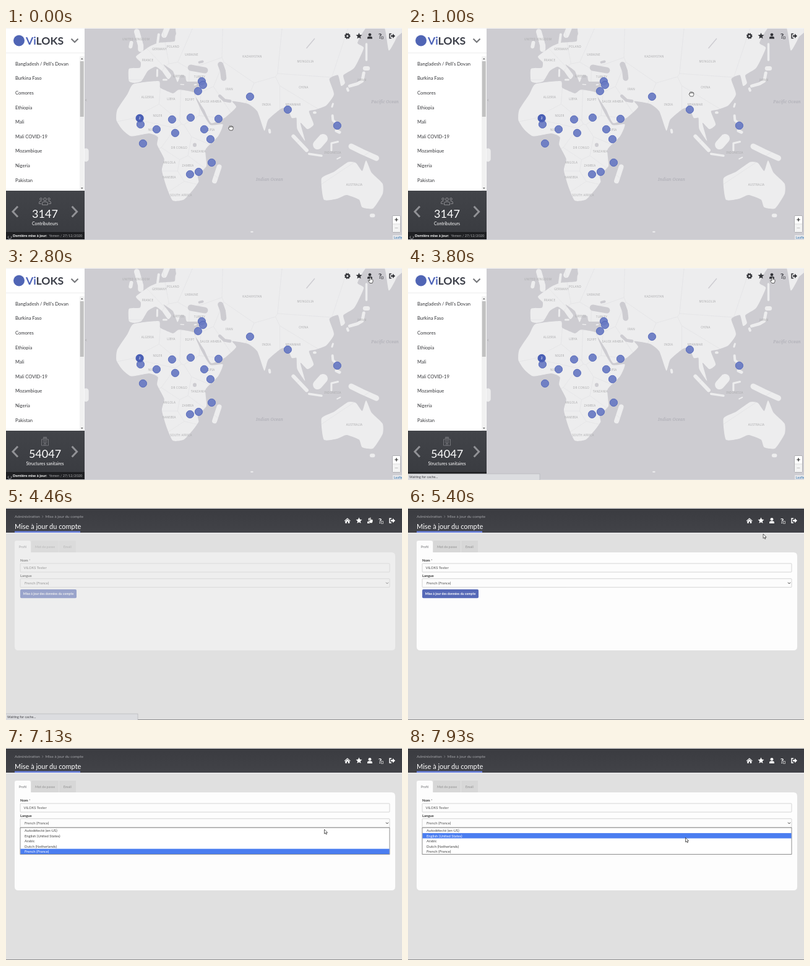
Recreate the animation shown at these times as an HTML page. Size 640 by 344 pixels, loop 8 s.

```html
<!DOCTYPE html>
<html lang="fr">
<head>
<meta charset="utf-8">
<style>
html, body { margin: 0; width: 100%; height: 100%; overflow: hidden; background: #e0e0e0; }
svg { display: block; width: 100vw; height: 100vh; font-family: Lato, "Open Sans", sans-serif; }
.map text { font: 4.5px "Noto Sans", "Open Sans", sans-serif; letter-spacing: .32px; fill: #aaaaac; text-anchor: middle; }
.map .sea { font: italic 6.8px "Noto Serif", serif; letter-spacing: .15px; fill: #aaaab2; }
.mid { text-anchor: middle; }
.b { font-weight: bold; }
</style>
</head>
<body>
<svg id="stage" viewBox="0 0 640 344"></svg>
<script>
const LOOP = 8000;
const stage = document.getElementById('stage');

const text = (x, y, size, fill, str, cls = '') =>
  `<text x="${x}" y="${y}" font-size="${size}" fill="${fill}" class="${cls}">${str}</text>`;
const rect = (x, y, w, h, fill, more = '') =>
  `<rect x="${x}" y="${y}" width="${w}" height="${h}" fill="${fill}" ${more}/>`;
const line = (d, color, w) => `<path d="${d}" fill="none" stroke="${color}" stroke-width="${w}"/>`;
const words = s => s.trim().split(/\s+/).map(w => w.split(','));

// Mercator: longitude/latitude to stage pixels
const project = ([lon, lat]) => [
  221.5 + lon * 2.53,
  187 - 145 * Math.log(Math.tan(Math.PI / 4 + lat * Math.PI / 360))
];
const points = s => words(s).map(p => project(p.map(Number)));
const pair = p => p.map(v => v.toFixed(1)).join(' ');

// Smooth closed coast through a few key points
function coast(s) {
  const pts = points(s), n = pts.length, at = i => pts[(i + n) % n];
  const lean = (i, k) => pair(at(i).map((v, c) => v + k * (at(i + 1)[c] - at(i - 1)[c]) / 11));
  return 'M' + pair(pts[0]) + pts.map((_, i) => `C${lean(i, 1)} ${lean(i + 1, -1)} ${pair(at(i + 1))}`).join('') + 'Z';
}
const mainland = [
  // Africa
  `-6,35.5 10,37 11,33.5 19,30.5 23,32.5 32.5,31 34,27 37.5,20 43,11.7 51,12 48,4.5 40,-4 40.5,-14.5 35,-20
   35.5,-24 32,-28.5 26,-34 19,-34.5 15,-27 12,-17 13.5,-10 9,-1 9.5,4 4,6.3 -7.5,4.5 -13,8.5 -17,14.5 -16.5,21 -10,30`,
  // Eurasia
  `-9,43 -9,37 -5.5,36 -1,37 3,42 8,44 12,42 16,38 18,40 13,45 19,42 22,36.5 24,40 27,39.5 28,36.8 36,36.5 34.5,31
   32.5,31 34,28 39,21 43.5,12.8 52,16 59.5,22.5 57,26 67,24.5 73,20 77.5,8 80,15 88,21.5 92,22 95,16 98,16 98.5,9
   103.5,1.5 100.5,13 105,9 109,12 106,20 110,21 117,23.5 122,30 119,38 124.5,40 126.5,34.5 129,36 128,40 135,43.5
   141,52 137,54 143,59.5 154,59.5 157,51 162,56 166,62 30,62 21,57 20,54.5 10,54 4,52.5 -4.5,48.5 -1.5,46 -2,43.5`,
  // Australia
  `114,-22 115.5,-34 124,-33.5 130,-31.5 138,-34 140,-38 147,-38.5 153,-31 153,-25 146,-18.5 142.5,-11 140,-17.5
   136,-12.5 131,-12 122,-18`
];
// Islands and inner seas are round strokes: width, then the spine
const islands = `9:-1.5,51.5 -1.5,53 -4,58|6:-8,52.5 -7.5,54|10:7,60 8,60|9:13.5,56.8 16,60|4:9.3,54 10,57
  |8:45.7,-23.5 48.6,-15|4:80.7,8.5 81,7|6:96,4.5 104.5,-4.5|3.5:106,-6.8 114,-8|15:111.5,-1 115,3|3:120.3,-4.5 120.3,0 124.5,1
  |9:133,-2 140,-5.5 149,-9.5|4:121,17.5 121.3,14.5 124,12.5|5:123.5,8 125.5,7|2:124,-10 126,-9|3:121.3,24.5 120.7,22.8
  |4:109.3,19.3 110,19.3|4:130.5,33 131,32|5:132,34.4 137,35.6 140,37 141,41|7:141.8,43.2 143.5,43.2|3.5:142.7,47 142.7,53.5
  |3:13,37.7 15,37.7|3:9,39.5 9.1,42.5|1.5:24,35.3 26,35.2|2:32.8,35 34,35.2|6:146,-42 147,-42|9:-36.5,-5 -36.5,-10|2:69,-49.3 70,-49.3`;
const seas = `10:30.5,43.5 34,43 39.5,42.3|4:36,46 38,46.3|9:49.5,45 51,42 51.5,38.5|5:49,29 52,26.5 55.5,26|6:33,-1 33,-1.2|1.5:104.5,52 109.5,55.5`;
const strokes = (s, color) => s.split('|').map(item => {
  const [w, spine] = item.trim().split(':');
  return line('M' + points(spine).map(pair).join('L'), color, w);
}).join('');

const labels = words(`UNITED_KINGDOM,210,20 GERMANY,248,36 FRANCE,229,54 POLAND,270,32 UKRAINE,300,45 GREECE,279,80
  TURKEY,313,81 KAZAKHSTAN,398,47.5 MONGOLIA,484,56 CHINA,481,98 JAPAN,575,86 ALGERIA,229,114 LIBYA,267,117 EGYPT,297,118
  SAUDI_ARABIA,331,121 IRAN,361,101 INDIA,421,126 MYANMAR,464,126 NIGER,245,144 NIGERIA,240,167 ETHIOPIA,326,167
  DR_CONGO,280,196 TANZANIA,311,202 ANGOLA,264,220 ZAMBIA,294,225 NAMIBIA,264,244 SOUTH_AFRICA,283,273
  AUSTRALIA,563,255.5 INDONESIA,528,203.5`).map(([s, x, y]) => ({ s: s.replace('_', ' '), p: [+x, +y] }));

// Borders: each label owns the land nearest to it
function cell(p) {
  let poly = [[0, 0], [640, 0], [640, 344], [0, 344]];
  for (const { p: q } of labels) {
    if (q === p) continue;
    const side = v => Math.hypot(v[0] - q[0], v[1] - q[1]) ** 2 - Math.hypot(v[0] - p[0], v[1] - p[1]) ** 2;
    poly = poly.flatMap((a, i) => {
      const b = poly[(i + 1) % poly.length], sa = side(a), sb = side(b), k = sa / (sa - sb);
      const cut = sa * sb < 0 ? [a.map((v, c) => v + k * (b[c] - v))] : [];
      return sa >= 0 ? [a, ...cut] : cut;
    });
  }
  return 'M' + poly.map(pair).join('L') + 'Z';
}

const sites = words(`316,86 318,92 310,102 394,111 455,132 535,158 298,145 268,148 343,147 217,156 243,164
  273,170 320,164 330,180 221,187 332,218 311,233 297,237`);

const star = 'M' + Array.from({ length: 10 }, (_, i) => {
  const r = i % 2 ? 2.4 : 5.2, a = i * Math.PI / 5;
  return `${(r * Math.sin(a)).toFixed(2)} ${(-r * Math.cos(a)).toFixed(2)}`;
}).join('L') + 'Z';
const gear = c => `<circle r="2.7" fill="none" stroke="${c}" stroke-width="2.2"/>
  <circle r="4" fill="none" stroke="${c}" stroke-width="1.5" stroke-dasharray="1.8 1.34"/>`;
const home = c => `<path d="M-5 .3L0-4.2 5 .3 4.3 1 0-2.8-4.3 1ZM-3.5 1L0-2 3.5 1V4.3H1V1.6H-1V4.3H-3.5Z" fill="${c}"/>`;
const toolbar = (y, first, c) => {
  const at = (x, s) => `<g transform="translate(${x} ${y})">${s}</g>`;
  return at(551.8, first(c)) + at(570.5, `<path d="${star}" fill="${c}"/>`) +
    at(588, `<circle cy="-2.2" r="2.4" fill="${c}"/><path d="M-4 4.5V3Q-4 .7-1.6 .7H1.6Q4 .7 4 3V4.5Z" fill="${c}"/>`) +
    at(604.5, text(0, 4.3, 12, c, '?', 'mid b') + `<rect x="2" y="1.2" width="3.2" height="3.4" fill="none" stroke="${c}" stroke-width=".6"/>`) +
    at(624, line('M-1-3.6H-4V3.6H-1', c, 1.5) + `<path d="M-2-1.2H1V-3.8L5 0 1 3.8V1.2H-2Z" fill="${c}"/>`);
};

const countries = ["Bangladesh / Pell's Dovan", 'Burkina Faso', 'Comores', 'Ethiopia', 'Mali',
  'Mali COVID-19', 'Mozambique', 'Nigeria', 'Pakistan'];
const people = `<circle cx="63" cy="278" r="2.3" fill="none" stroke="#a2a3a6" stroke-width=".8"/>` +
  [56.5, 69.5].map(x => `<circle cx="${x}" cy="277.5" r="1.7" fill="none" stroke="#a2a3a6" stroke-width=".8"/>`).join('') +
  line('M58.5 287V285Q58.5 282 61 282H65Q67.5 282 67.5 285V287ZM57.5 281H56Q53.5 281 53.5 283.5V285H57M68.5 281H70Q72.5 281 72.5 283.5V285H69', '#a2a3a6', .8);
const clinic = line('M57.5 288V278H68.5V288ZM60.5 278V274.5H65.5V278M63 275V277.5M61.8 276.2H64.2M61.8 288V284.5H64.2V288M59.5 280.5H66.5M59.5 283H66.5', '#8b8c90', .7);
const slide = (id, icon, n, label) =>
  `<g id="${id}">${icon}${text(63, 308, 18, '#fff', n, 'mid')}${text(63, 319.5, 6.9, '#fff', label, 'mid')}</g>`;

const mapPage = `<g id="mapPage">
  ${rect(0, 0, 640, 344, '#cdccd1')}
  <mask id="soil" maskUnits="userSpaceOnUse" x="0" y="0" width="640" height="344">
    <path d="${mainland.map(coast).join('')}" fill="#fff"/>
    <g stroke-linecap="round" stroke-linejoin="round">${strokes(islands, '#fff')}${strokes(seas, '#000')}</g>
  </mask>
  <g mask="url(#soil)">${rect(0, 0, 640, 344, '#ededee')}${line(labels.map(l => cell(l.p)).join(''), '#e3e3e5', .5)}</g>
  <g class="map">
    ${labels.map(({ s, p }) => `<text x="${p[0]}" y="${p[1]}">${s}</text>`).join('')}
    <text class="sea" x="426" y="248">Indian Ocean</text><text class="sea" x="612.5" y="122">Pacific Ocean</text>
  </g>
  <g transform="translate(.4 .4)">
    ${sites.map(([x, y]) => `<circle cx="${x}" cy="${y}" r="6.1" fill="#687ac3" fill-opacity=".93" stroke="#5165b9" stroke-width=".9"/>`).join('')}
    <circle cx="215.7" cy="146" r="6.6" fill="#4a5fb5"/>${text(215.7, 148.1, 5.5, '#fff', '2', 'mid')}
  </g>
  ${toolbar(13, gear, '#34353a')}
  ${rect(624.5, 304.5, 13, 27, '#fff', 'rx="1.5" stroke="#b0b0b4"')}
  ${rect(625, 318, 12, 13, '#f4f4f4')}${line('M625 318H637', '#ccc', .6)}
  ${line('M628.3 311H633.7M631 308.3V313.7', '#222', 1.2)}${line('M628.5 324.5H633.5', '#bbb', .9)}
  ${rect(625, 336, 15, 7, '#e4e4e7')}${text(627, 341.6, 5.2, '#3178b4', 'Leaflet')}
  ${line('M130 115.5L128.5 117 130 118.5', '#999', .7)}
  ${rect(0, 0, 127, 264, '#fff')}
  <circle cx="21" cy="20.5" r="9" fill="#5065b5"/>
  <text x="32" y="26.5" font-size="17.6" class="b" fill="#3b3e48"><tspan fill="#4c62b8">Vi</tspan>LOKS</text>
  ${line('M105.5 17.5L111 23 116.5 17.5', '#77787c', 2.2)}
  ${rect(0, 40, 127, 1, '#ececec')}
  ${countries.map((s, i) => text(15, 60.8 + i * 23.6, 7.6, '#36373b', s)).join('')}
  ${rect(119, 46, 7.5, 218, '#f1f1f1')}${rect(119.7, 54, 6, 90, '#c1c1c1')}
  <path d="M121 51L122.8 48.8 124.6 51ZM121 259L122.8 261.2 124.6 259Z" fill="#666"/>
  ${rect(0, 264, 127, 67, 'url(#panel)')}
  ${line('M19 289.5L11 298 19 306.5M106.6 289.5L114.6 298 106.6 306.5', '#919296', 3)}
  ${slide('people', people, '3147', 'Contributeurs')}
  ${slide('clinics', clinic, '54047', 'Structures sanitaires')}
  ${rect(0, 331, 127, 12, '#1f2023')}
  ${line('M4.3 337.5A2.7 2.7 0 1 0 8.2 337.8', '#b8b8bb', .8)}
  ${text(11, 339.3, 6, '#fff', 'Dernière mise à jour:', 'b')}${text(69.5, 339.3, 5.7, '#a9aaad', 'Yemen / 27/12/2020')}
  ${rect(0, 343, 640, 1, '#d9d9dc')}
</g>`;

const options = ['Autodétecté (en-US)', 'English (United States)', 'Arabic', 'Dutch (Netherlands)', 'French (France)'];
const title = 'Mise à jour du compte';
const field = y => rect(23, y, 597, 14, '#fcfcfc', 'rx="1" stroke="#c9c9c9" stroke-width=".8"');
const formPage = `<g id="formPage">
  ${rect(0, 0, 640, 344, '#e0e0e0')}
  ${rect(0, 0, 640, 40, 'url(#head)')}${rect(0, 40, 640, 1.5, '#ebebed')}
  ${text(14, 16.2, 6.3, '#a3a4a8', 'Administration')}${line('M58.2 12.3L60 14 58.2 15.7', '#85868a', .7)}${text(63.5, 16.2, 6.3, '#a3a4a8', title)}
  ${text(14, 33.7, 11, '#fff', title)}${rect(14, 37.5, 106, 2.5, '#6b82e0')}
  ${toolbar(20.5, home, '#fff')}
  <g id="form">
    ${rect(41, 53, 44, 19, '#d7d7d7')}${rect(86, 53, 27, 19, '#d7d7d7')}
    <path d="M14 78V56Q14 53 17 53H37Q40 53 40 56V72H623Q629 72 629 78V225Q629 231 623 231H20Q14 231 14 225Z" fill="#fdfdfd"/>
    ${text(27, 64.8, 5.5, '#77787b', 'Profil', 'mid')}${text(63, 64.8, 5.4, '#a2a2a2', 'Mot de passe', 'mid b')}${text(99.3, 64.8, 5.4, '#a2a2a2', 'Email', 'mid b')}
    ${text(23, 87.3, 5.8, '#333', 'Nom <tspan fill="#888">*</tspan>', 'b')}
    ${field(90)}${text(28.5, 99.2, 5.9, '#555', 'ViLOKS Tester')}
    ${text(23, 112.3, 5.8, '#333', 'Langue', 'b')}
    ${field(114.7)}${text(30, 123.9, 5.9, '#555', 'French (France)')}
    ${line('M614 120.8L616 122.8 618 120.8', '#333', 1)}
    ${rect(23, 132, 91, 14.3, '#5669b7', 'rx="2"')}${text(68.5, 141, 5.2, '#fff', 'Mise à jour des données du compte', 'mid b')}
  </g>
  <g id="menu">
    ${rect(23, 129.2, 597, 43.3, '#fff', 'stroke="#707070" stroke-width=".8"')}
    <rect id="pick" x="23.4" width="596.2" height="8.5" fill="#4a7df0"/>
    ${options.map((s, i) => text(30, 136 + i * 8.5, 5.9, '#444', s, 'opt')).join('')}
  </g>
  ${rect(0, 343, 640, 1, '#8c8c8e')}
</g>`;

const ink = 'fill="#fff" stroke="#222" stroke-width=".7" stroke-linejoin="round"';
stage.innerHTML = `<defs>
  <linearGradient id="panel" x2="0" y2="1"><stop stop-color="#424449"/><stop offset="1" stop-color="#3a3c41"/></linearGradient>
  <linearGradient id="head" x2="0" y2="1"><stop stop-color="#3a3b40"/><stop offset="1" stop-color="#424348"/></linearGradient>
  </defs>${mapPage}${formPage}
  <g id="status">${rect(-1, 334, 214, 11, '#dcdde0', 'stroke="#b4b5b9" stroke-width=".7"')}${text(2, 341.2, 5.5, '#44454a', 'Waiting for cache...')}</g>
  ${rect(0, 0, 640, 1, '#f4f4f4')}
  <path id="grab" d="M-2 4L-4 .6Q-4-.8-2.6 0V-2.4Q-1.8-3.5-1.1-2.5-.3-3.8 .6-2.7 1.6-3.5 2.2-2.1 3.4-2.5 3.6-1.1V1.6L2.5 4ZM-1.1-2.5V-.6M.6-2.7V-.6M2.2-2.1V-.6" ${ink}/>
  <path id="point" d="M-1 0Q0-1.3 1 0V3Q2 2.3 2.6 3.2 3.6 2.8 4 4V6.3L3 9H-1L-3.6 5.2Q-3.4 3.8-2 4.7L-1 5.4Z" ${ink}/>
  <path id="arrow" d="M0 0V7.2L1.7 5.7 2.8 8.2 4 7.7 2.9 5.3H5.1Z" ${ink}/>`;

const $ = id => document.getElementById(id);
const show = (id, on) => $(id).setAttribute('display', on ? 'inline' : 'none');
const ramp = (t, a, b) => Math.min(1, Math.max(0, (t - a) / (b - a)));
const ease = p => p * p * (3 - 2 * p);

// Pointer moves: start time, end time, target
const moves = [[200, 1800, 552.5, 52], [1800, 2500, 589, 15.5], [5000, 6250, 527.5, 125],
  [6650, 7130, 514.5, 132], [7200, 7900, 448.5, 145.5]];
const pointer = t => moves.reduce(([x, y], [a, b, tx, ty]) => {
  const p = ease(ramp(t, a, b));
  return [x + (tx - x) * p, y + (ty - y) * p];
}, [363.5, 162]);

function draw(t) {
  const onForm = t >= 3860, [x, y] = pointer(t);
  show('mapPage', !onForm);
  show('formPage', onForm);
  show('status', t >= 3000 && t < 4700);
  $('people').setAttribute('opacity', 1 - ramp(t, 1300, 1600));
  $('clinics').setAttribute('opacity', ramp(t, 1600, 1910));
  $('form').setAttribute('opacity', ramp(t, 3860, 5060));

  show('menu', t >= 6560);
  const picked = t < 7200 ? 4 : y < 138 ? 0 : 1;
  $('pick').setAttribute('y', 129.6 + picked * 8.5);
  document.querySelectorAll('.opt').forEach((o, i) => o.setAttribute('fill', i === picked ? '#fff' : '#444'));

  const kind = y < 24 ? 'point' : onForm ? 'arrow' : 'grab';
  for (const id of ['grab', 'point', 'arrow']) show(id, id === kind);
  $(kind).setAttribute('transform', `translate(${x.toFixed(2)} ${y.toFixed(2)})`);
}

const start = performance.now();
function tick(now) {
  draw(Math.max(0, now - start) % LOOP);
  requestAnimationFrame(tick);
}
draw(0);
requestAnimationFrame(tick);
</script>
</body>
</html>
```
